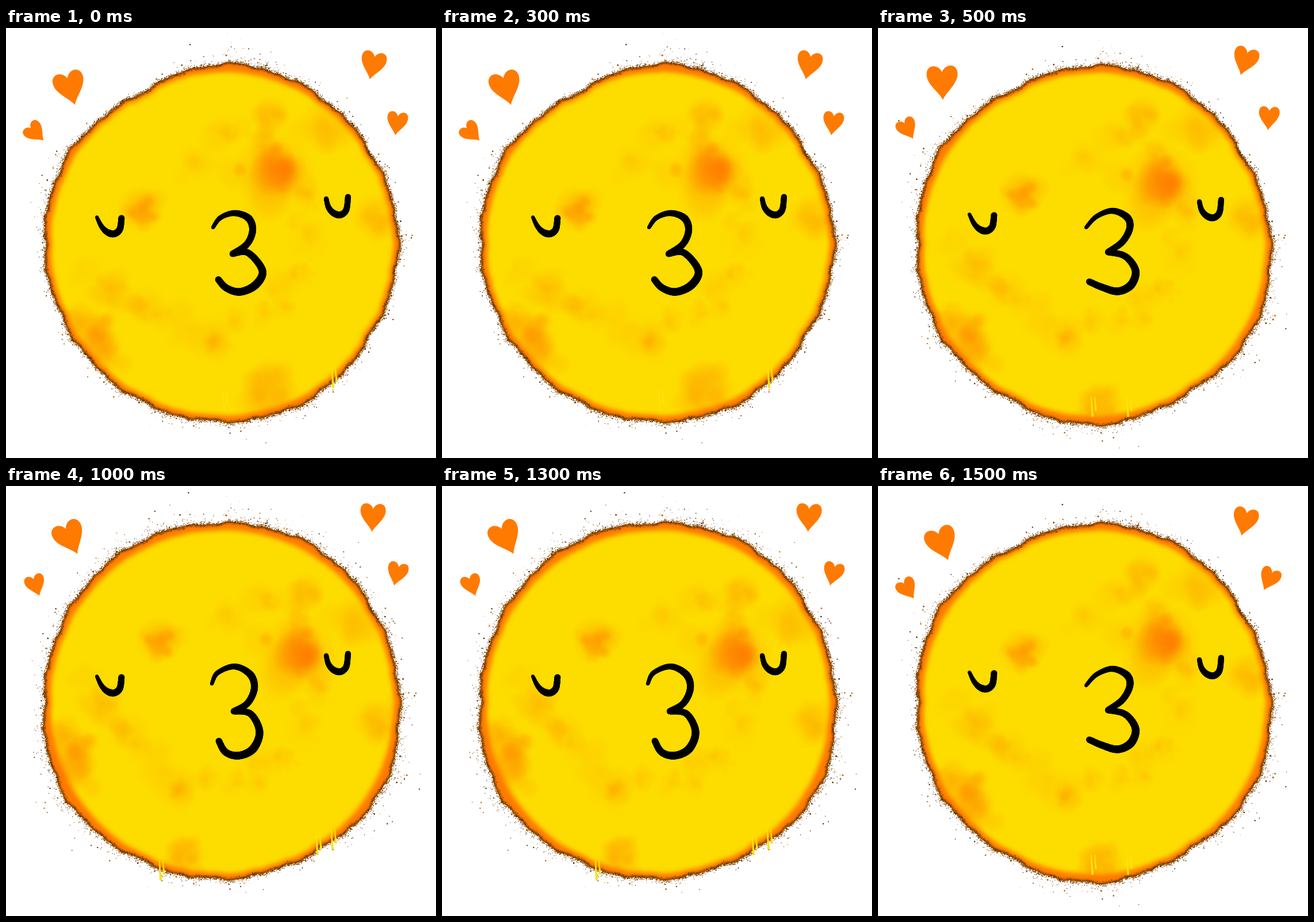
These frames come from a looping animation (748x748 px, 2000 ms). An HTML page with a canvas:

```html
<!DOCTYPE html>
<html lang="en">
<head>
<meta charset="utf-8">
<title>Kissing face</title>
<style>
  html, body { margin: 0; width: 100%; height: 100%; overflow: hidden; background: #fff; }
  canvas { display: block; }
</style>
</head>
<body>
<canvas id="stage" width="748" height="748"></canvas>
<script>
const SIZE = 748, CENTER = 376, HOLD = 500, RADIUS = 300;
const ORANGE = '#ff7a00', YELLOW = '#fddc00', BROWN = '#5c3200';
const BROWNS = [BROWN, '#7a4300', '#4a2a00', '#b86000'];

// bulge: how far the rim stands out beyond RADIUS, clockwise from the top.
const poses = [
  {
    bulge: [14, 9, 4, 7, 3, 10, 9, 7, 6, 9, 10, -1],
    turn: 0, rimTurn: 0, leftEye: [0, 0], rightEye: [0, 0],
    lips: ['360,347 373,330 398,322 422,331 429,352 419,376 394,393',
      '394,393 421,391 446,422 434,447 407,459 383,452 369,437'],
    stain: [460, 632, 52], drips: '378,630 568,592'
  },
  {
    bulge: [11, 9, 2, 8, 14, 6, 15, 7, 11, 8, 14, 4],
    turn: 11.7, rimTurn: 0, leftEye: [1, -5], rightEye: [2, 5],
    lips: ['362,347 380,328 408,318 433,329 438,348 425,372 400,390',
      '400,390 430,397 448,422 440,447 417,458 390,451 367,441'],
    stain: [388, 660, 42], drips: '372,642 434,642'
  },
  {
    bulge: [12, 15, 8, 9, 17, 6, 8, 10, 19, 10, 11, 14],
    turn: 21.3, rimTurn: 17, leftEye: [0, 2], rightEye: [0, -2],
    lips: ['358,344 368,325 398,314 425,328 432,352 420,378 396,392',
      '396,392 425,396 441,427 430,457 405,469 382,463 370,443'],
    stain: [312, 643, 36], drips: '268,652 541,608 567,598'
  }
];
const poseOrder = [0, 1, 2, 1];

const hearts = [
  { x: 112, y: 106, width: 54, height: 59, lift: 15, tilts: [-16, -2, -25, -20] },
  { x: 52, y: 183, width: 35, height: 38, lift: 10, tilts: [-46, -29, -19, -33] },
  { x: 638, y: 66, width: 44, height: 49, lift: 11, tilts: [12, 17, 3, 13] },
  { x: 680, y: 167, width: 36, height: 41, lift: 14, tilts: [8, 4, 14, 25] }
];
const heartShape = new Path2D(
  'M0 .5C-.1 .28 -.5 .04 -.5 -.26C-.5 -.57 -.12 -.58 0 -.32C.12 -.58 .5 -.57 .5 -.26C.5 .04 .1 .28 0 .5Z');

let seed = 1;
const random = () => (seed = seed * 16807 % 2147483647) / 2147483647;
const spread = () => random() + random() + random() - 1.5;
const falloff = mean => -Math.log(random()) * mean;
const pairs = text => text.split(' ').map(p => p.split(',').map(Number));
const radians = degrees => degrees * Math.PI / 180;
const polar = (angle, r) => [CENTER + r * Math.sin(angle), CENTER - r * Math.cos(angle)];

// Smooth curve through points, returned as dense samples.
function spline(points, closed) {
  const n = points.length, samples = [];
  const at = i => points[closed ? (i + n) % n : Math.max(0, Math.min(n - 1, i))];
  for (let i = 0; i < (closed ? n : n - 1); i++) {
    const [a, b, c, d] = [at(i - 1), at(i), at(i + 1), at(i + 2)];
    for (let step = 0; step < 20; step++) {
      const t = step / 20;
      samples.push([0, 1].map(k => b[k] + .5 * t * (c[k] - a[k]
        + t * (2 * a[k] - 5 * b[k] + 4 * c[k] - d[k] + t * (3 * (b[k] - c[k]) + d[k] - a[k])))));
    }
  }
  return samples;
}

function dot(g, x, y, r) {
  g.beginPath();
  g.arc(x, y, r, 0, 7);
  g.fill();
}

// Stroke whose radius runs from r0 over r1 to r2.
function brush(g, points, r0, r1, r2) {
  const samples = spline(points);
  samples.forEach(([x, y], i) => {
    const t = i / samples.length * 2;
    dot(g, x, y, t < 1 ? r0 + (r1 - r0) * t : r1 + (r2 - r1) * (t - 1));
  });
}

function blob(g, x, y, r, alpha) {
  const fill = g.createRadialGradient(x, y, 0, x, y, r);
  [[0, 1], [.5, .75], [.8, .25], [1, 0]].forEach(([stop, k]) =>
    fill.addColorStop(stop, `rgba(255,118,0,${alpha * k})`));
  g.fillStyle = fill;
  dot(g, x, y, r);
}

function cloud(g, x, y, r, strength) {
  blob(g, x, y, r, strength * .9);
  for (let i = 0; i < 8; i++) {
    blob(g, x + spread() * r, y + spread() * r * .8, r * (.3 + random() * .35), strength * .35);
  }
}

function turned(g, degrees, draw) {
  g.save();
  g.translate(CENTER, CENTER);
  g.rotate(radians(degrees));
  g.translate(-CENTER, -CENTER);
  draw();
  g.restore();
}

function drawClouds(g, pose) {
  seed = 77;
  turned(g, pose.turn, () => {
    const trail = spline(pairs(
      '160,430 213,475 270,495 355,555 393,515 480,485 520,345 505,275 412,172 325,242'));
    for (let i = 0; i < trail.length; i += 5) {
      const [x, y] = trail[i];
      cloud(g, x + spread() * 18, y + spread() * 18, 18 + random() * 20, .03 + random() * .11);
    }
    cloud(g, 467, 250, 72, .25);
    cloud(g, 467, 250, 46, .65);
    cloud(g, 235, 315, 42, .28);
    cloud(g, 233, 322, 24, .35);
  });
  turned(g, pose.rimTurn, () => {
    cloud(g, 460, 152, 36, .22);
    cloud(g, 560, 170, 50, .2);
    cloud(g, 650, 330, 44, .2);
    cloud(g, 150, 530, 42, .4);
    cloud(g, 165, 565, 40, .35);
  });
  cloud(g, ...pose.stain, .35);
}

function rimRadius({ bulge }) {
  const profile = spline(bulge.map((height, i) => [i, height]), true);
  const phase = random() * 9;
  return turn => {
    const a = turn * 2 * Math.PI;
    return RADIUS + profile[Math.floor(turn * profile.length)][1]
      + 1.6 * Math.sin(17 * a + phase) + 1.2 * Math.sin(29 * a + phase * 3) + .8 * Math.sin(61 * a);
  };
}

// Grain on the rim, and spray that grows where the rim bulges.
function drawRim(g, radius) {
  const speck = (turn, distance, size) => {
    g.fillStyle = BROWNS[Math.floor(random() * 4)];
    dot(g, ...polar(turn * 2 * Math.PI, radius(turn) + distance), size);
  };
  for (let i = 0; i < 5000; i++) speck(random(), spread() * 4, .4 + random() * .5);
  for (let i = 0; i < 2200; i++) {
    const turn = random(), reach = Math.max(.25, (radius(turn) - RADIUS) / 14);
    speck(turn, falloff(6 * reach), .3 + random() * .5);
    if (i % 11 === 0) speck(turn, falloff(13 * reach), .6 + random() * .9);
  }
}

function drawFeatures(g, pose) {
  const shifted = (text, [dx, dy]) => pairs(text).map(([x, y]) => [x + dx, y + dy]);
  brush(g, shifted('158,329 166,345 176,355 188,358 198,350 201,330', pose.leftEye), 2.8, 6.1, 5.4);
  brush(g, shifted('557,297 561,312 570,322 582,325 592,316 595,293', pose.rightEye), 3.9, 6, 5);
  brush(g, pairs(pose.lips[0]), 3, 6.3, 5.6);
  brush(g, pairs(pose.lips[1]), 5.2, 7.2, 5.6);
}

function renderFace(pose, index) {
  const layer = document.createElement('canvas');
  layer.width = layer.height = SIZE;
  const g = layer.getContext('2d');
  seed = 5 + index;
  const radius = rimRadius(pose);
  const edge = Array.from({ length: 720 }, (_, i) => polar(radians(i / 2), radius(i / 720)));
  const outline = new Path2D('M' + edge.join('L') + 'Z');

  g.save();
  g.clip(outline);
  g.fillStyle = g.strokeStyle = ORANGE;
  g.fillRect(0, 0, SIZE, SIZE);
  g.filter = 'blur(5px)';
  g.fillStyle = YELLOW;
  dot(g, CENTER, CENTER, RADIUS);
  g.lineWidth = 16;
  g.stroke(outline);
  g.filter = 'none';
  drawClouds(g, pose);
  g.filter = 'blur(2px)';
  g.strokeStyle = BROWN;
  g.lineWidth = 4;
  g.stroke(outline);
  g.restore();

  drawRim(g, radius);
  g.fillStyle = '#ffe010';
  for (const [x, y] of pairs(pose.drips)) {
    brush(g, [[x - 1, y], [x, y + 18], [x + 1, y + 33]], 1, 1.4, 2);
    brush(g, [[x + 5, y], [x + 6, y + 12], [x + 7, y + 23]], .8, 1.2, 1.6);
  }
  g.fillStyle = '#000';
  drawFeatures(g, pose);
  return layer;
}

const faces = poses.map(renderFace);
const ctx = document.getElementById('stage').getContext('2d');

function drawHeart({ x, y, width, height, lift, tilts }, step) {
  const rise = .5 - .5 * Math.cos((step + .25) * Math.PI / 2);
  ctx.save();
  ctx.translate(x, y - lift * rise);
  ctx.rotate(radians(tilts[step]));
  ctx.scale(width, height);
  ctx.fill(heartShape);
  ctx.restore();
}

const start = performance.now();
function frame() {
  const step = Math.floor((performance.now() - start) / HOLD) % 4;
  ctx.fillStyle = '#fff';
  ctx.fillRect(0, 0, SIZE, SIZE);
  ctx.drawImage(faces[poseOrder[step]], 0, 0);
  ctx.fillStyle = ORANGE;
  hearts.forEach(heart => drawHeart(heart, step));
  requestAnimationFrame(frame);
}
frame();
</script>
</body>
</html>
```
